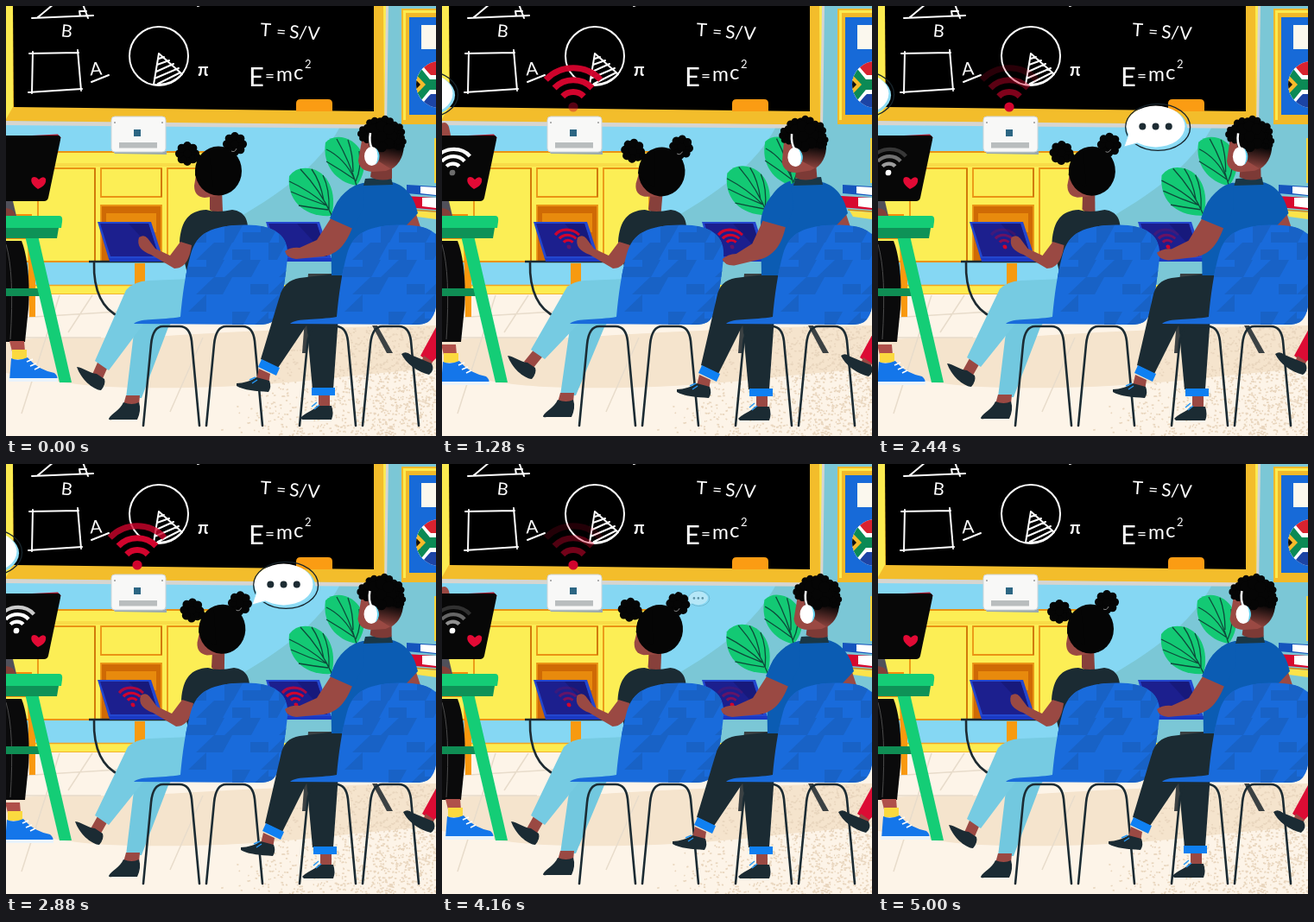
Recreate the animation shown at these times as an HTML page. Size 498 px wide and 498 px high, loop 5040 ms.

```html
<!DOCTYPE html>
<html lang="en">
<head>
<meta charset="utf-8">
<title>Classroom</title>
<style>
html, body { margin: 0; width: 100%; height: 100%; overflow: hidden; background: #fdf4e8; }
svg { display: block; width: 498px; height: 498px; }
.chalk { fill: none; stroke: #fff; stroke-width: 2; stroke-linecap: round; stroke-linejoin: round; }
.chalk text { fill: #fff; stroke: none; font-family: Lato, sans-serif; }
.metal { fill: none; stroke: #1b2b33; stroke-width: 2.6; stroke-linecap: round; }
.vein { fill: none; stroke: #0c4a3a; stroke-width: 1.3; }
</style>
</head>
<body>
<svg id="stage" viewBox="0 0 498 498" xmlns="http://www.w3.org/2000/svg"></svg>
<script>
const LOOP = 5040;
const SKIN = '#9a4943', DARK = '#1b2b33', BLUE = '#196bdb', RED = '#d2042d';
const stage = document.getElementById('stage');

let seed = 11;
const rnd = () => (seed = (seed * 16807) % 2147483647) / 2147483647;
const path = (d, fill, extra = '') => `<path d="${d}" fill="${fill}" ${extra}/>`;
const rect = (x, y, w, h, fill, extra = '') =>
  `<rect x="${x}" y="${y}" width="${w}" height="${h}" fill="${fill}" ${extra}/>`;
const oval = (x, y, rx, ry, fill, extra = '') =>
  `<ellipse cx="${x}" cy="${y}" rx="${rx}" ry="${ry}" fill="${fill}" ${extra}/>`;
const group = (id, body, extra = '') => `<g id="${id}" ${extra}>${body}</g>`;

// A curly ball: a disc ringed with smaller discs
function curls(x, y, r, n) {
  let s = oval(x, y, r, r, '#050505');
  for (let i = 0; i < n; i++) {
    const a = i / n * Math.PI * 2;
    s += oval(x + r * .8 * Math.cos(a), y + r * .8 * Math.sin(a), r * .42, r * .42, '#050505');
  }
  return s;
}

function speckle() {
  let d = '';
  for (let i = 0; i < 1300; i++) {
    const x = 235 + 263 * Math.sqrt(rnd()), y = 372 + 126 * rnd();
    if (x + (y - 372) * .9 < 345) continue;
    d += `M${x.toFixed(1)} ${y.toFixed(1)}l${(1 + rnd() * 2).toFixed(1)} ${(rnd() * 2 - 1).toFixed(1)}`;
  }
  return path(d, 'none', 'stroke="#e9d6be" stroke-width="1.7"');
}

const room = () =>
  rect(0, 0, 498, 335, '#85d7f3') +
  path('M238 264C290 232 355 200 388 138H436L440 0H498V330H238Z', '#7bc7d6') +
  rect(0, 323, 498, 11, '#fcec50') +
  path('M0 323.5H240M0 334H210', 'none', 'stroke="#f0a323" stroke-width="1.5"') +
  rect(0, 334, 498, 164, '#fdf4e8') +
  path('M0 388C60 380 110 386 150 384S330 372 498 370V420C400 426 330 440 210 442S70 436 0 425Z', '#f5e4cd') +
  path('M100 335L72 378M62 335L18 472M0 362L130 354M228 384L190 470M0 384H110', 'none',
    'stroke="#e8dccb" stroke-width="1.5"') + speckle();

const board = () =>
  path('M0 133L438 137 439 0H443L441 142 0 138Z', '#d6d5d0') +
  path('M0 0H439L438 137.500 0 133Z', '#f3bd2b') +
  path('M0 0H8V117L0 131ZM437 0H440L438 137Z', '#fceb50') +
  path('M8 0H426V122L9 117Z', '#000') +
  path('M336 122V113Q336 108 341 108H373Q378 108 378 113V122Z', '#fb9c13') +
  `<g class="chalk">
    <path d="M30 14L101 11M37 13L55 -2M89 -2L95 14M86 12L85 6 93 6M222 0L230 -3"/>
    <path d="M31 53L30 101M27 55L84 54M83 51L87 98M26 100L88 96M99 88L119 80"/>
    <circle cx="177" cy="58" r="34"/>
    <path d="M177 55L171 91Q190 93 204 79ZM177 61L183 59M175 68L189 63M174 76L194 67M172 84L200 72M176 90L202 77"/>
    <text x="64" y="36" font-size="20" transform="rotate(6 70 29)">B</text>
    <text x="97" y="80" font-size="21" transform="rotate(-4 104 72)">A</text>
    <text x="222" y="81" font-size="20" font-weight="bold">π</text>
    <text y="37" font-size="21" transform="rotate(4 329 34)"><tspan x="294">T</tspan><tspan
      x="313" font-size="19">=</tspan><tspan x="328">S</tspan><tspan x="339">/</tspan><tspan x="349">V</tspan></text>
    <text y="93" font-size="31"><tspan x="281">E</tspan><tspan x="300" y="88" font-size="19">=</tspan><tspan
      x="313" y="87" font-size="23">m</tspan><tspan x="333" y="85" font-size="24">c</tspan><tspan
      x="346" y="72" font-size="13">2</tspan></text>
  </g>`;

const cabinet = () =>
  rect(0, 169, 240, 128, '#fcee55') +
  rect(0, 182, 225, 4, '#f8dc48') +
  rect(110, 231, 70, 66, '#cf6a05') + path('M116 240H174V262H116Z', '#e88a0d') +
  path('M0 169H240M0 296H240M37 188H103V296H37ZM110 188H180V221H110ZM110 231H180V296H110ZM187 188H240V296H187Z',
    'none', 'stroke="#ea9314" stroke-width="1.8"') +
  path('M103 188V296M180 188V221', 'none', 'stroke="#c86f05" stroke-width="1.5"') +
  rect(149, 298, 12, 26, '#f79a10');

const router = () =>
  path('M124 168H186V172L126 171Z', '#9aa9ae') +
  rect(122, 128, 63, 41, '#f8f8f7', 'rx="4" stroke="#cfd5d8"') +
  rect(131, 158, 44, 6.5, '#b9bdbe') +
  oval(126, 135, 1, 1, '#999') + oval(181, 135, 1, 1, '#999') +
  rect(148, 143, 8, 8, '#2c6683');

const wallArt = () =>
  path('M458 3H498V137H458Z', '#f2b928') + path('M460 5H498V8H463V132H460Z', '#fcea4e') +
  rect(467, 13, 31, 113, '#176ad8') + rect(481, 22, 17, 28, '#fbf8ee') +
  `<clipPath id="disc"><circle cx="502" cy="91" r="27"/></clipPath>
  <g clip-path="url(#disc)">` +
  rect(474, 63, 24, 56, '#fff') + path('M470 60H498V80H492Z', '#d8232f') +
  path('M470 122H498V102H492Z', '#1c44a5') +
  path('M466 64L488 91 466 118M484 91H500', 'none', 'stroke="#fff" stroke-width="19"') +
  path('M466 64L488 91 466 118M484 91H500', 'none', 'stroke="#0b8a55" stroke-width="12"') +
  path('M466 70L486 91 466 112Z', '#f6bb2b') + path('M466 76L480 91 466 106Z', '#111') + '</g>' +
  rect(496, 153, 2, 52, '#f8d53c') +
  path('M464 207L498 209V220L464 217Z', '#1554bd') + path('M480 209L498 210V219L480 217Z', '#fff') +
  path('M462 220L498 222V236L462 233Z', '#d7092e') + path('M482 222H498V234L482 232Z', '#fff') +
  path('M472 237L498 239V247L476 244Z', '#fbe34a') + path('M470 236L498 238', 'none', 'stroke="#d98b12" stroke-width="1.5"');

const plant = () => group('plant',
  path('M406 208C382 204 366 184 370 158Q379 149 393 153C415 160 422 188 406 208Z', '#13c974') +
  `<path class="vein" d="M406 208Q398 180 383 154M404 201Q392 176 371 166M404 201Q388 190 371 180M402 192Q402 172 396 155M405 203Q412 188 409 168"/>` +
  path('M377 243C345 245 325 225 328 197Q336 186 351 188C373 191 384 216 377 243Z', '#13c974') +
  `<path class="vein" d="M378 244Q364 213 341 189M371 231Q352 214 328 203M371 231Q350 224 330 215M373 236Q356 234 339 231M368 225Q364 203 354 189M374 236Q375 212 367 196"/>`);

const wifi = (id, x, y, k, color, skew = 0) => {
  let s = oval(0, 0, 5.6, 5.6, color, 'class="wave"');
  for (const r of [17, 30.5, 44]) {
    const c = r * .72;
    s += `<path class="wave" d="M${-c} ${-c}A${r} ${r} 0 0 1 ${c} ${-c}" fill="none" stroke="${color}" stroke-width="7"/>`;
  }
  return group(id, s, `transform="translate(${x} ${y}) skewX(${skew}) scale(${k})"`);
};

const tablet = x =>
  path(`M${x} 250H${x + 62}L${x + 76} 293H${x + 13}Z`, '#2347cf') +
  path(`M${x + 3} 252H${x + 59}L${x + 71} 290H${x + 15}Z`, '#1c1f8e') +
  path(`M${x + 36} 252H${x + 59}L${x + 71} 290Z`, '#17197c') +
  path(`M${x + 13} 292H${x + 98}V296H${x + 14}Z`, '#1a39c4');

const desk = () =>
  path('M96 296H222M102 297C101 330 112 352 132 360', 'none', 'stroke="#1d2a31" stroke-width="2.6"') +
  path('M350 310H390V314H352L349 402H343ZM424 370H430L448 402H441Z', '#3b4143') +
  tablet(106) + tablet(301) +
  wifi('wifiA', 147, 279, .44, RED, 8) + wifi('wifiB', 336, 279, .44, RED, 8);

function chairTiles() {
  let d = '';
  for (let r = 0; r < 6; r++) for (let c = 0; c < 9; c++) {
    const x = 148 + c * 21 + (r % 2) * 9, y = 254 + r * 20, k = rnd();
    if (k < .3) d += `M${x} ${y + 20}L${x + 21} ${y}V${y + 20}Z`;
    else if (k < .5) d += `M${x} ${y}H${x + 21}L${x + 10} ${y + 20}H${x}Z`;
    else if (k < .68) d += `M${x} ${y + 8}H${x + 21}V${y + 20}H${x}Z`;
  }
  return d;
}
const SEAT = 'M148 368C156 361 180 364 202 360C204 336 208 308 214 287C221 263 238 254 277 253.500C308 253 329 264 326 292C323 320 320 338 316 353C312 366 305 369 294 369Z';
const tiles = chairTiles();
const chair = x => `<g transform="translate(${x})">
  <path class="metal" d="M159 486L168 392Q170 371 182 371H201Q213 371 215 388L224 486M232 486L241 392Q243 371 255 371H274Q286 371 288 388L297 486"/>
  ${path(SEAT, BLUE)}<g clip-path="url(#seat)">${path(tiles, '#1862c6')}</g></g>`;

const SHOE = 'M0 0C8 1 14 7 23 8L32 14Q34 20 28 27C18 26 5 14 0 0Z';

const girl = () =>
  path('', '#72c8df', 'id="legBack"') +
  group('footBack', path('M139 451H155L154 462H136Z', SKIN) +
    path('M119 478C122 472 132 468 136 459Q146 463 154 459Q157 468 152 479H123Q119 480 119 478Z', DARK)) +
  path('', 'none', `id="shin" stroke="${SKIN}" stroke-width="13"`) +
  path('', '#76cbe2', 'id="legFront"') +
  group('footFront', path(SHOE, DARK, 'transform="translate(82 418)"')) +
  group('girlTop',
    group('girlHead', path('M236 212H250L251 238Q244 242 236 236Z', '#87403b') +
      path('M221 190L218 208Q218 221 230 222L246 220V190Z', SKIN) +
      curls(210, 171, 11.5, 8) + curls(265, 160, 11.5, 8) +
      oval(222, 176, 4, 5, '#050505') + oval(260, 169, 4, 5, '#050505') +
      oval(246, 191, 27, 28.5, '#050505') + path('M219 196Q219 174 235 167L240 210Q226 205 219 196Z', '#050505') +
      path('M261 168q4 2 6 -3', 'none', 'stroke="#bbb" stroke-width=".7"')) +
    path('M201 273C203 248 212 237 232 236Q244 240 262 236C277 238 281 248 280 262L275 310H210Z', DARK) +
    path('M202 273L215 277C213 293 207 304 195 304L168 288C157 284 151 278 154 268Q160 264 164 269L173 281 190 289Z', SKIN));

const boy = () =>
  path('M346 345H386L379 444H355Z', DARK) +
  group('bootBack', path('M362 449H375V466H362Z', SKIN) +
    path('M341 477C346 471 356 469 360 463L377 463Q380 472 377 479H343Z', DARK) +
    path('M354 464l6 -5M357 467l6 -5', 'none', 'stroke="#2698f5" stroke-width="1.5"') +
    rect(354, 442, 27, 9, '#0f80f2')) +
  path('', DARK, 'id="thigh"') +
  group('bootFront', path('M293 420L306 426 304 438 290 433Z', SKIN) +
    path('M267 437C275 437 284 434 290 430L305 434Q308 441 304 447C290 446 275 445 267 440Z', DARK) +
    path('M282 433l7 -3M285 437l6 -4', 'none', 'stroke="#2698f5" stroke-width="1.5"') +
    path('M296 409L317 419 313 428 292 418Z', '#0f80f2')) +
  group('boyTop',
    path('M461 240L474 238 480 256 462 262Z', SKIN) +
    path('M414 205L447 204C464 208 473 222 477 240L462 256V312H377L376 250Q380 215 414 205Z', '#0b5cb3') +
    group('boyArm',
      path('M376 246L401 257C394 275 385 287 368 290L336 293Q325 292 323 284Q330 279 340 280L360 271Z', SKIN) +
      path('M414 205C395 208 383 225 375 246L402 258 413 236Z', '#0b5cb3')) +
    path('M416 200L446 198 448 207 414 208Z', '#193746') +
    group('boyHead',
      path('M424 183H447V200Q433 204 422 198Z', '#7d3a36') +
      path('M412 156L408 179Q409 191 424 192L440 191Q458 185 460 158Z', SKIN) +
      path('M427 155H461Q462 180 446 189L432 180Z', 'url(#fade)') +
      [[418, 148, 9], [427, 141, 10], [439, 139, 10], [450, 146, 10], [454, 157, 8], [435, 151, 15]]
        .map(b => curls(b[0], b[1], b[2], 8)).join('') +
      path('M422 147Q420 158 424 165', 'none', 'stroke="#fff" stroke-width="2.5"') +
      oval(423.5, 174, 8.5, 11, '#fff') + path('M428 164Q437 174 428 184Q433 174 428 164Z', '#5fd0ee')));

const learner = () =>
  group('hand', path('M-6 160V140Q4 130 8 140L11 154V165Z', SKIN)) +
  path('M0 241H30V270H0Z', '#f48d0c') + path('M25 268H34V360H27Z', '#f9990f') +
  path('M0 272H18C25 290 28 320 26 350L22 389H0Z', '#0a0a0b') +
  path('M0 276Q10 310 5 386', 'none', 'stroke="#4b4b4b" stroke-width="1"') +
  group('sneaker', path('M4 388H21L22 400H7Z', '#b0504a') + rect(7, 398, 17, 11, '#fbd93f') +
    path('M6 408Q14 412 25 407C34 418 46 423 56 425Q61 429 59 434H4Z', '#1476ea') +
    path('M3 431H60V435H3Z', '#e9f3fb') +
    path('M24 412l7 -3M28 417l7 -3M33 421l6 -3', 'none', 'stroke="#fff" stroke-width="1.6"')) +
  path('M0 327H37L39 336H0Z', '#0f8d54') +
  path('M22 266H37L76 436H62Z', '#14cd76') +
  path('M0 257H61L59 269H0Z', '#0e9257') + path('M0 243H62Q66 243 65 250L64 257H0Z', '#14cd76') +
  path('M0 226H8L12 243H0Z', '#50505a') + path('M0 234Q10 235 11 243H0Z', '#844039') +
  path('M30 150L60 148.500 64 153 50 155Z', '#a9182c') +
  path('M0 150L60 150Q64 150 63 155L49 222Q48 226 44 226H0Z', '#070707') +
  path('M37 212C30 207 28 203 30 199Q34 196 38 201Q43 196 46 200C47 205 44 209 37 212Z', '#e20a35') +
  wifi('wifiC', 12, 193, .6, '#fff', -4);

const bubble = id => group(id,
  oval(45, -26, 43, 31, 'none', 'stroke="#17242b" stroke-width="1.6"') +
  oval(44, -25, 40, 28, '#8edcf5') +
  path('M0 0L7 -20 22 -6Z', '#fff', 'stroke="#8edcf5" stroke-width="1"') + oval(42, -27, 39, 27.5, '#fff') +
  [24.5, 42, 59.5].map(x => oval(x, -27, 4.6, 4.6, '#1d2c33')).join(''));

stage.innerHTML = `<defs>
  <clipPath id="seat"><path d="${SEAT}"/></clipPath>
  <linearGradient id="fade" x1=".4" y1="0" x2=".2" y2="1">
    <stop offset=".2" stop-color="#050505"/><stop offset="1" stop-color="${SKIN}"/></linearGradient></defs>` +
  room() + board() + cabinet() + wallArt() + plant() + router() + wifi('wifiR', 152, 117, 1, RED) +
  desk() + bubble('talkB') + girl() + chair(0) + boy() + chair(181) +
  group('guest', path('M498 372L480 405 492 414 498 408Z', '#dc0c34') + path('M484 405L494 412 490 421 480 414Z', SKIN) +
    path('M458 403Q463 399 469 404L481 409 493 414Q497 422 490 427C477 424 463 414 458 403Z', DARK)) +
  bubble('talkA') + learner() +
  group('star', path('M0 -34C1 -6 6 -1 34 0C6 1 1 6 0 34C-1 6 -6 1 -34 0C-6 -1 -1 -6 0 -34Z', '#fff') +
    oval(0, 0, 8, 8, '#fff'));

const el = Object.fromEntries([...stage.querySelectorAll('[id]')].map(n => [n.id, n]));
const waves = ['wifiR', 'wifiA', 'wifiB', 'wifiC'].map(k => [...el[k].querySelectorAll('.wave')]);
const set = (id, v) => el[id].setAttribute('transform', v);
const move = (id, x, y = 0) => set(id, `translate(${x} ${y})`);
const shape = (id, d) => el[id].setAttribute('d', d);

const ramp = (t, a, b) => Math.min(1, Math.max(0, (t - a) / (b - a)));
const ease = u => u * u * (3 - 2 * u);
const POSES = [0, 680, 1280, 2000, 2880, 4160, 5000];

function track(t, vals, times = POSES) {
  for (let i = 1; i < times.length; i++)
    if (t < times[i]) {
      const u = ease(ramp(t, times[i - 1], times[i]));
      return vals[i - 1] + (vals[i] - vals[i - 1]) * u;
    }
  return vals[vals.length - 1];
}

// Rise start, rise end, fall start, fall end, for the dot and each arc
const PULSE = [[0, 150, 640, 880], [0, 330, 900, 1740], [20, 440, 930, 1740], [60, 800, 1000, 1740]];
function signal(t, i) {
  if (t < 500) return 0;
  const p = (t - 500) % 1740, [a, b, c, d] = PULSE[i];
  return ramp(p, a, b) * (1 - ramp(p, c, d)) * (1 - ramp(t, 4200, 4500));
}

function talk(id, t, x, y, start, end) {
  const s = track(t, [0, 1, .84, .87, .87, 0],
    [start, start + 220, start + 420, start + 560, end, end + 260]);
  set(id, `translate(${x} ${y}) scale(${t < start ? 0 : s})`);
  el[id].setAttribute('opacity', 1 - .95 * ramp(t, end + 60, end + 220));
}

function draw(t) {
  const girlX = track(t, [0, 5.5, 3, -1, 2, 2.5, 0]);
  move('girlTop', girlX);
  set('girlHead', `rotate(${track(t, [0, 7.5, 7, .5, 3, 4.5, 0])} 241 236)`);

  // The knee swings against the foot
  const fx = track(t, [0, -10, -6, -2, -2, -2, 0]), fy = track(t, [0, -18, -13, -4, -4, -4, 0]);
  move('footFront', fx, fy);
  shape('shin', `M113 ${413 + fy}L${106 + fx} ${429 + fy}`);
  shape('legFront', `M214 316L165 318Q${148 - fx * .8} 319 ${139 - fx} ${329 + fy * .3}L103 ${411 + fy}L119 ${422 + fy}L164 362 214 366Z`);
  const bx = track(t, [0, -2, -2, 0, 0, -2, 0]), by = track(t, [0, -3, -3, -1, -1, -3, 0]);
  move('footBack', bx, by);
  shape('legBack', `M152 345H206L188 372L${157 + bx} ${454 + by}H${139 + bx}Z`);

  move('boyTop', track(t, [0, -5, -7, -3, 0, 0, 0]));
  set('boyArm', `rotate(${track(t, [0, -8, -8, -3, 0, 0, 0])} 394 228)`);
  const nod = track(t, [0, -6, -8, -5, -.5, -.5, -.5]);
  set('boyHead', `translate(${nod * .65}) rotate(${nod * .6} 434 204)`);
  const kx = track(t, [0, 3, 5, 5, 5, 0, 0]), ky = track(t, [0, 6, 7, 7, 7, 0, 0]);
  move('bootFront', kx, ky);
  move('bootBack', track(t, [0, 0, 2, 2, 2, 2, 0]), track(t, [0, 0, 1, 1, 1, 1, 0]));
  shape('thigh', `M390 309L340 315Q322 318 ${317 + kx * .3} 336L${295 + kx} ${409 + ky}L${315 + kx} ${419 + ky}L348 370 384 364Z`);

  move('sneaker', track(t, [0, -3, -5, -5, -5, 0, 0]), track(t, [0, 2, 4, 4, 4, 0, 0]));
  move('guest', track(t, [0, 2, 4, 2, 2, 1, 0]), track(t, [0, 1, 2, 0, 0, 0, 0]));
  move('hand', 0, track(t, [22, 0, 0, 20, 20, 7, 22]));
  set('plant', `rotate(${track(t, [0, 2, 3, 1.6, 0, 2.4, 0])} 392 240)`);

  for (const w of waves) w.forEach((n, i) => n.setAttribute('opacity', signal(t, i)));
  talk('talkA', t, -58, 125, 460, 3000);
  talk('talkB', t, 285, 163, 1780, 4000);
  set('star', `translate(435 44) scale(${track(t, [0, 1, 0], [460, 680, 900])})`);
}

function tick() {
  draw(performance.now() % LOOP);
  requestAnimationFrame(tick);
}
tick();
</script>
</body>
</html>
```
